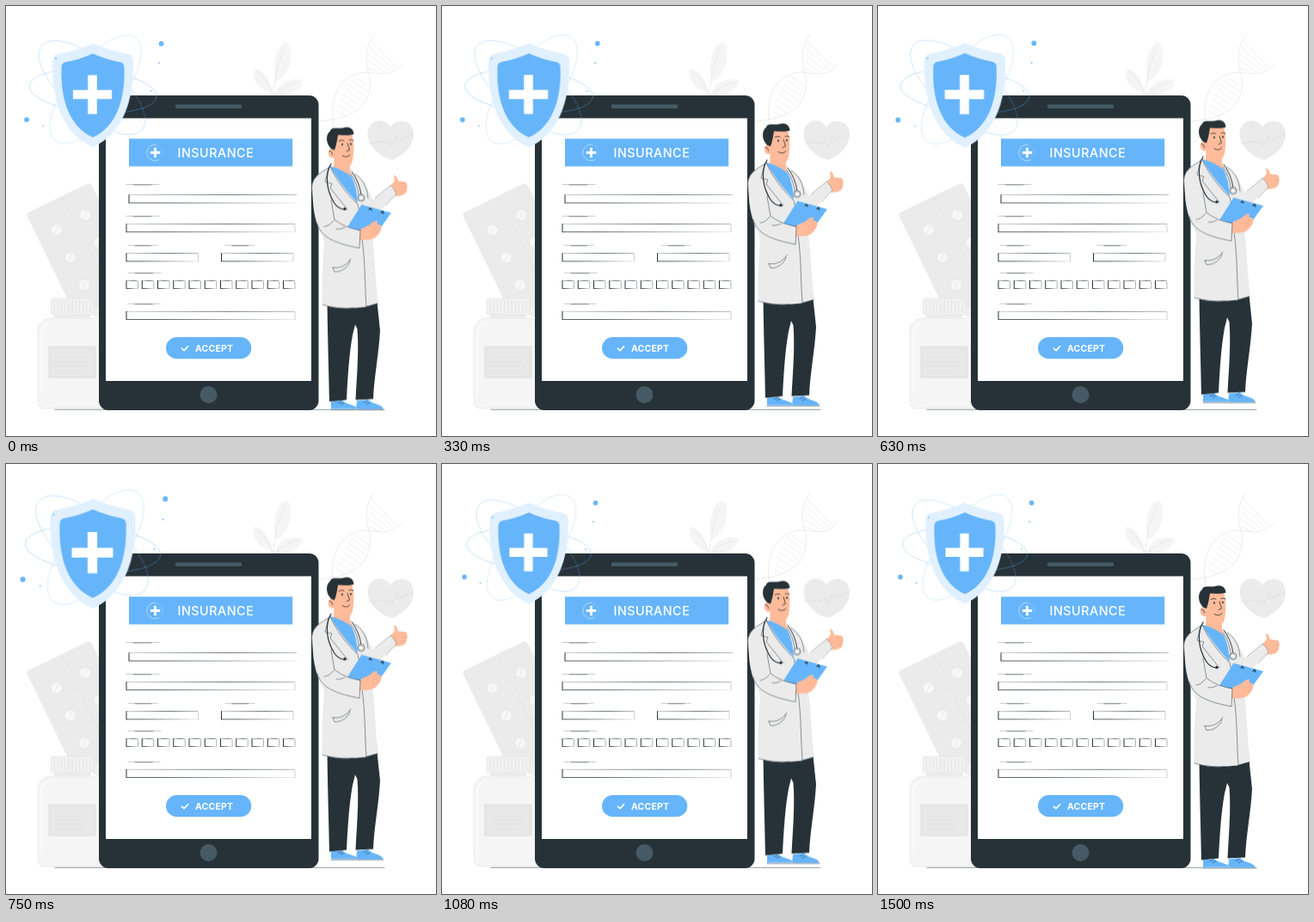
Animation of 500 by 500 pixels, one loop 1.54 s. Source, as an HTML page:

```html
<!DOCTYPE html>
<html lang="en">
<head>
<meta charset="utf-8">
<title>Insurance</title>
<style>
html, body { margin: 0; width: 100%; height: 100%; overflow: hidden; background: #fff; }
svg { display: block; width: 100vw; height: 100vh; }
text { font-family: Inter, "Open Sans", sans-serif; fill: #fff; }
.blue { fill: #66b5fb; }
.dark { fill: #263238; }
.slate { fill: #455a64; }
.coat { fill: #ebebeb; }
.skin { fill: #ffbb9a; }
.white { fill: #fff; }
.ink { fill: none; stroke: #263238; stroke-width: .5; stroke-linecap: round; stroke-linejoin: round; }
.pale { fill: none; stroke: #e0e0e0; stroke-width: .6; }
.crease { fill: none; stroke: #ec9f80; stroke-width: .5; }
.orbit { fill: none; stroke: #66b5fb; stroke-width: .35; }
#shield { transform-origin: 101px 99px; animation: beat 1540ms linear -40ms infinite; }
#doctor { animation: float 1540ms linear -40ms infinite; }
@keyframes beat {
  0%, 30%, 40%, 60%, 100% { transform: scale(1); }
  10%, 50% { transform: scale(1.1); }
}
@keyframes float {
  0%, 100% { transform: translateY(0); }
  50% { transform: translateY(-10px); }
}
</style>
</head>
<body>
<svg viewBox="0 0 500 500">
  <defs>
    <linearGradient id="fade">
      <stop offset=".2" stop-color="#263238"/>
      <stop offset="1" stop-color="#263238" stop-opacity=".1"/>
    </linearGradient>
    <linearGradient id="rise">
      <stop offset="0" stop-color="#263238" stop-opacity=".35"/>
      <stop offset=".6" stop-color="#263238"/>
      <stop offset="1" stop-color="#263238" stop-opacity=".5"/>
    </linearGradient>
  </defs>

  <!-- plant -->
  <g fill="#f5f5f5">
    <path d="M314 88C309 70 313 47 326 42C336 48 333 78 314 88Z"/>
    <path d="M310 102C306 82 297 73 288 73C286 87 295 98 310 102Z"/>
    <path d="M312 104C317 88 332 82 346 87C341 101 326 105 312 104Z"/>
    <path class="pale" d="M311 104C312 85 316 66 324 50M310 102C306 90 298 80 291 76M312 104C322 95 332 90 341 89"/>
  </g>

  <!-- dna -->
  <g id="dna" class="pale">
    <path d="M428 33C416 50 418 67 423 82C426 108 414 130 364 134"/>
    <path d="M461 67C447 84 432 78 418 77C390 78 377 104 380 131C382 142 378 150 368 158"/>
  </g>

  <!-- heart -->
  <path class="coat" d="M449 179C432 175 420 160 420.500 148C421 132 440 128 447 141C454 129 474 132 474 149C474 162 464 173 449 179Z"/>
  <path d="M421 160L437 158L441 160L445 157L449 163L454 150L456 156L473 150" fill="none" stroke="#d8d8d8" stroke-width=".6"/>

  <!-- blister pack -->
  <path class="coat" d="M26 240L94 207Q98 205 100 209L125 260V350L76 350L25 245Q23.500 242 26 240Z"/>
  <path class="pale" d="M73 236L109 311M65 223L71 235"/>
  <g id="pills"></g>

  <!-- bottle -->
  <circle cx="107" cy="355" r="6.500" fill="#f0f0f0" stroke="#e0e0e0" stroke-width=".6"/>
  <rect x="56" y="356" width="42" height="12" fill="#ececec"/>
  <rect x="52" y="340" width="50" height="19" rx="3" fill="#f2f2f2" stroke="#e0e0e0" stroke-width=".6"/>
  <g id="ridges" class="pale"></g>
  <path d="M50 363H103Q113 366 113 379V468H45Q37 468 37 459V379Q37 366 50 363Z" fill="#f5f5f5" stroke="#e6e6e6" stroke-width=".7"/>
  <path d="M41 452V381Q42 370 52 368" fill="none" stroke="#fff" stroke-width="1.200"/>
  <rect x="49" y="395" width="56" height="38" fill="#e8e8e8"/>
  <path d="M51 397H103V431H51ZM55 409H97M55 414H93M55 419H97M55 424H90" fill="none" stroke="#d8d8d8" stroke-width=".5"/>

  <path class="ink" d="M57 469.300H440"/>

  <!-- tablet -->
  <rect class="dark" x="108" y="104" width="255.500" height="366" rx="11"/>
  <rect class="slate" x="197" y="114.500" width="77" height="4.500" rx="1"/>
  <rect class="white" x="116" y="130.500" width="239" height="305.500"/>
  <circle class="slate" cx="235.500" cy="452" r="10"/>
  <rect class="blue" x="143" y="154.300" width="190.200" height="32.200"/>
  <path d="M174 161.300A9.300 9.300 0 1 0 178 178.500" fill="none" stroke="#fff" stroke-width=".5"/>
  <path d="M174 161.300A9.300 9.300 0 0 1 181 175" fill="none" stroke="#fff" stroke-width=".3" opacity=".6"/>
  <path d="M173.500 164.800V176.200M167.800 170.500H179.200" stroke="#fff" stroke-width="2.800"/>
  <text x="199.500" y="175.500" font-size="14.300" font-weight="500" letter-spacing=".55">INSURANCE</text>
  <g id="form" class="ink"></g>
  <rect class="blue" x="186" y="385" width="99.300" height="25.300" rx="12.650"/>
  <path d="M204 397.800L207 400.600L212 395.300" fill="none" stroke="#fff" stroke-width="1.700"/>
  <text x="220" y="401.600" font-size="10.500" font-weight="700" letter-spacing=".2">ACCEPT</text>

  <!-- shield -->
  <g id="shield">
    <g class="orbit">
      <ellipse cx="101" cy="99" rx="72.500" ry="24" transform="rotate(5 101 99)"/>
      <ellipse cx="100" cy="95" rx="74" ry="31" transform="rotate(40 100 95)" stroke-dasharray="3 .6"/>
      <ellipse cx="104" cy="97" rx="74" ry="31" transform="rotate(-52 104 97)" opacity=".6"/>
    </g>
    <path d="M101 45Q121 53.500 141 57Q146.500 58.500 146.500 65C148 113 133 148 101 162.500C69 148 54 113 55.500 65Q55.500 58.500 61 57Q81 53.500 101 45Z" fill="#e0f0fe"/>
    <path class="blue" d="M101 56.500Q117 63.500 131.500 66Q136.500 67 136.500 72C138 111 126 140 101 151.200C76 140 64 111 65.500 72Q65.500 67 70.500 66Q85 63.500 101 56.500Z"/>
    <path d="M100.500 80.800V124.800M78.500 102.800H122.500" stroke="#fff" stroke-width="10.300"/>
    <g class="blue">
      <circle cx="178.500" cy="45.200" r="2.800"/>
      <circle cx="176" cy="67" r=".9"/>
      <circle cx="26" cy="131.300" r="2.800"/>
      <circle cx="44.500" cy="138.300" r=".8"/>
      <circle cx="167" cy="99" r=".8"/>
      <circle cx="59" cy="62" r=".9"/>
    </g>
  </g>

  <!-- doctor -->
  <g id="doctor">
    <path class="blue" d="M378 460.500L391 459C396 464.500 408 464 409 469.500H378Z"/>
    <path class="blue" d="M408 459.500L421 458C427 464.500 438 463 439 470H407Z"/>
    <path d="M378 469.200H409M407 469.700H439" stroke="#d3e9fe" stroke-width="1"/>
    <path class="ink" d="M386 462L390 460.500M389 463.500L393 462M416 461.500L420 460M419 463.500L423 462M378 470H439"/>
    <path class="dark" d="M373.500 340H431L435 378C433.500 405 428 432 427 457.500L406.500 458.500C408 430 410.500 402 408.500 376L406 371L403 383C399 405 397.500 430 396 458.500L376 460.500C375.500 425 374 390 373.500 340Z"/>

    <!-- raised arm and hand -->
    <path class="skin" d="M447 209C451 206 453 203 451 199C450 196 455 197 456 204L464 205C468 206 467 215 464 219C459 222 454 222 450 221Z"/>
    <path class="crease" d="M459 206.500H465M460 211H466M459 215.500H465"/>
    <path class="coat" d="M409 199C417 204 421 214 427 226L447 209Q452 213 454 219L434 239Q426 246 418 238Z"/>
    <path class="ink" d="M429 224L447 209Q452 213 454 219L442 232" opacity=".6"/>

    <!-- coat -->
    <path class="coat" d="M377 186C368 194 357 197 355.500 211C356 226 359 240 364 255L370 275C368 300 367 325 367.500 348Q388 354 407 351.500L418 350.500L433 346C429 320 430 300 426 270L421 224C420 210 413 200 403 194Z"/>
    <path class="ink" d="M368 348Q386 353 404 351.500M414 271C418 300 417 325 419 350M419 350L432 346.500M421 224C420 210 414 201 406 196M377 187C368 194 357 197 355.500 211C356 226 359 240 362 253"/>
    <path class="skin" d="M382 170L381 188L402 204L399 182Z"/>
    <path class="blue" d="M377 187Q389 189 402 199Q408 211 409 230C397 217 386 203 377 187Z"/>
    <path class="ink" d="M377 187C384 203 396 219 409 231L412 245M401 196Q409 206 411 225M375 189L371 205L379 207L377 212L397 237"/>
    <path class="ink" d="M378 184C370 197 373 216 382 230Q386 236 393 237" style="stroke-width:1.2"/>
    <path class="ink" d="M402 193Q411 205 413 220" style="stroke-width:.9"/>
    <circle class="dark" cx="394" cy="236.500" r="1.700"/>
    <circle cx="413" cy="223.500" r="4" fill="#cfd3d5" stroke="#263238" stroke-width=".5"/>
    <circle class="white" cx="413" cy="223.500" r="1.800"/>
    <path class="ink" d="M380 304.500C389 306 396 302 401 294.500M380 304.500L382 309.500C391 310 398 304 400 297"/>

    <!-- head -->
    <path class="skin" d="M380 153C388 147 397 148 402.500 151C405 160 405 170 403 180C401 189 394 190 388 185L382 177C375 179 372 169 378 166Z"/>
    <path class="dark" d="M379 167C372 162 371 150 377 146C378 140.500 386 143.500 393 142C399 140.500 404 143 404.500 149.500C398 152 391 150 386 150.500C385 157 384 163 382 168Z"/>
    <path class="ink" d="M387 157.500Q390 155.500 393 157M399 156.500Q402 155 404 157M397 160L399.500 168L396 169.500M391 174.500Q396 178 400 173.500M376 169Q379 169 379.500 173" style="stroke-width:.8"/>
    <ellipse class="dark" cx="391" cy="161.500" rx=".9" ry="1.300"/>
    <ellipse class="dark" cx="401" cy="161" rx=".9" ry="1.300"/>

    <!-- clipboard and near arm -->
    <path class="blue" d="M413.500 231.500L448 241L428 269L396 259Z"/>
    <path class="ink" d="M422 237L424 235.500L425 238M436 241L438 239L439 242" style="stroke-width:1.1"/>
    <path class="skin" d="M409 264C415 256 421 258 425 253C430 249 434 250 431 254L435 255C439 258 434 266 429 270C422 274 415 271 409 274Z"/>
    <path class="crease" d="M425 262L434 257.500M426 266L434 261.500"/>
    <path class="coat" d="M358 207C355 226 358 244 363 258C366 270 384 277 411 282L412 262L381 252L374 220Z"/>
    <path class="ink" d="M378 226L382 249Q395 259 412 261L411 282C386 277 366 271 362 253M381 250Q375 257 370 257M394 258Q388 261 384 260"/>
  </g>
</svg>
<script>
const NS = "http://www.w3.org/2000/svg";
const byId = id => document.getElementById(id);

function add(parent, tag, attrs) {
  const el = document.createElementNS(NS, tag);
  for (const key in attrs) el.setAttribute(key, attrs[key]);
  parent.appendChild(el);
}
const line = (parent, d, width = .6, opacity = 1) =>
  add(parent, "path", { d, style: `stroke-width:${width};opacity:${opacity}` });
const bar = (x, y, width, height, paint) =>
  add(byId("form"), "rect", { x, y: y - height / 2, width, height, stroke: "none", fill: `url(#${paint})` });

// Sketchy field: strong left edge, lower edge fading to the right
function field(x, y, w, h = 9.3, right = .45) {
  line(byId("form"), `M${x} ${y + h}V${y}`, 1);
  bar(x, y, w, .65, "rise");
  bar(x, y + h, w, .75, "fade");
  line(byId("form"), `M${x + w} ${y + 1}v${h - 1}`, .5, right);
}
function label(x, y, w) {
  line(byId("form"), `M${x} ${y}h${w}`, .4, .65);
  line(byId("form"), `M${x + 8} ${y + .5}h${w * .55}`, .6, .8);
}

label(140, 207.5, 38);
label(140, 244.3, 38);
label(142, 278.3, 34);
label(255, 278.3, 34);
label(142, 310.3, 38);
label(142, 346.3, 37);
field(143, 219.7, 195, 9.3, 0);
field(140, 253.5, 196);
field(140, 287.6, 83.5);
field(250.5, 287.6, 83.5);
field(140, 355.2, 196);
for (let i = 0; i < 11; i++) field(140 + i * 18.25, 319.5, 13.5, 9, .75);

for (let i = 0; i < 5; i++) {
  const col = i < 3 ? 0 : 1, row = i - col * 3;
  const cx = 58.5 + col * 33.5 + row * 16.2, cy = 260.5 - col * 17.5 + row * 32;
  add(byId("pills"), "circle", { cx, cy, r: 6.6, fill: "#f7f7f7", stroke: "#e0e0e0", "stroke-width": .6 });
  add(byId("pills"), "path", { class: "pale", d: `M${cx - 2} ${cy + 5}l4 -10` });
}
for (let x = 56; x < 101; x += 4.2) line(byId("ridges"), `M${x} 342v15`, .8);

for (let i = 0; i < 8; i++) {
  const s = Math.sin((i + 1) / 9 * Math.PI) * 8;
  line(byId("dna"), `M${385 + i * 3 - s * .3} ${123 - i * 5.8 - s * .4}L${394 + i * 4 + s * .6} ${128 - i * 4.8 + s * .2}`, .5);
}
for (let i = 0; i < 5; i++) line(byId("dna"), `M${424 - i * .9} ${40 + i * 8}L${455 - i * 5} ${72 + i * 1.5}`, .5);
</script>
</body>
</html>
```
